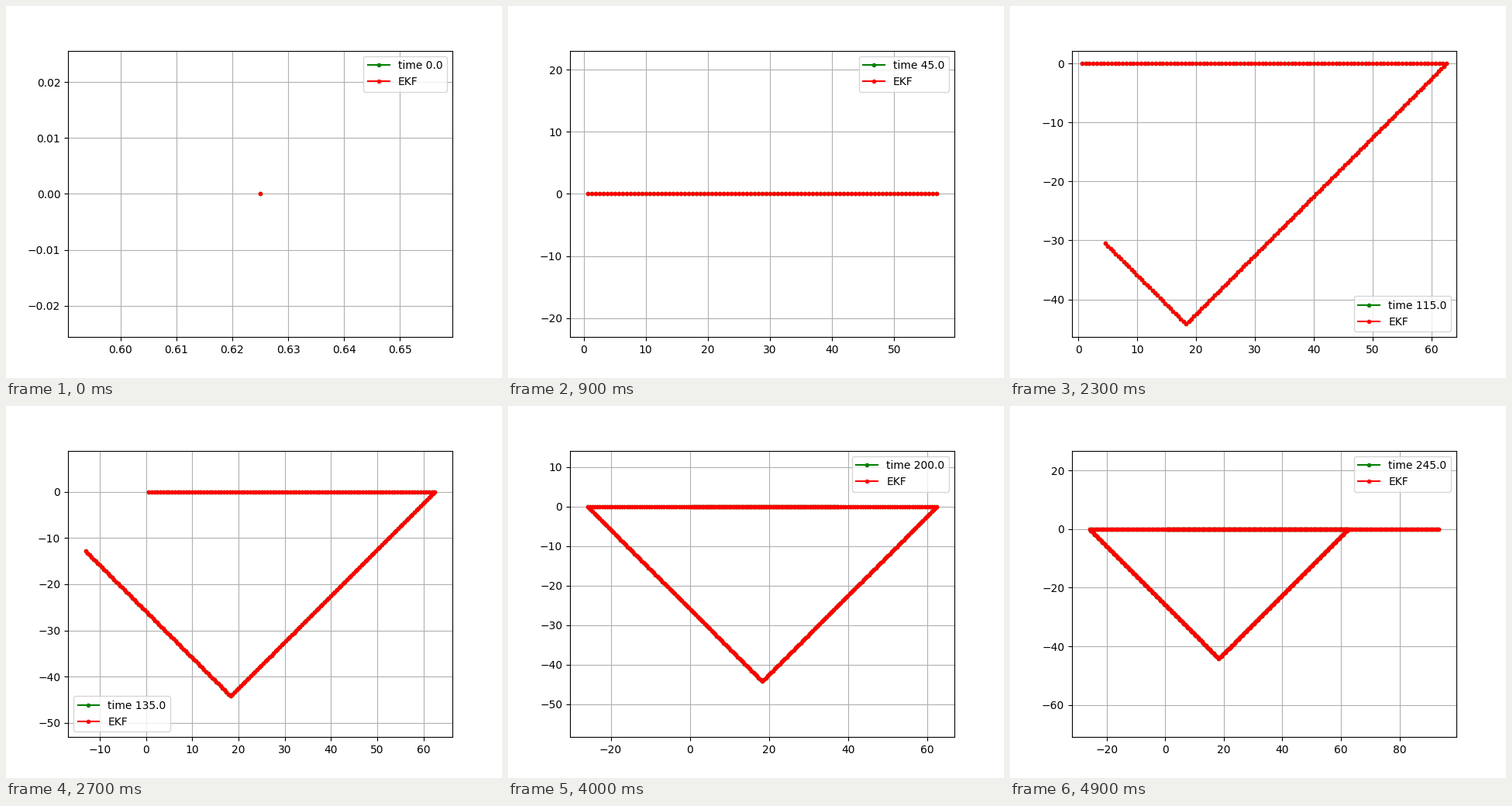
These frames come from a looping animation (640 px wide and 480 px high, 5 s). A matplotlib script:

```python
import numpy as np
import matplotlib.pyplot as plt
from matplotlib.animation import FuncAnimation

FRAMES = 50
INTERVAL = 100          # ms
DT = 0.5                # simulated seconds per sample
SPEED = 1.25
SAMPLES_PER_FRAME = 10

# Heading of each leg in degrees, and its number of samples.
HEADINGS = [0, -135, 135, 0]
LEG_SAMPLES = [100, 100, 100, 200]


def make_path():
    angles = np.radians(np.repeat(HEADINGS, LEG_SAMPLES))
    x = np.cumsum(SPEED * DT * np.cos(angles))
    y = np.cumsum(SPEED * DT * np.sin(angles))
    return x, y


path_x, path_y = make_path()
fig, ax = plt.subplots(figsize=(6.4, 4.8), dpi=100)


def draw(frame):
    last = frame * SAMPLES_PER_FRAME
    x, y = path_x[:last + 1], path_y[:last + 1]
    ax.cla()
    ax.plot(x, y, "g.-", label=f"time {last * DT:.1f}")
    ax.plot(x, y, "r.-", label="EKF")
    ax.axis("equal")
    ax.grid(True)
    ax.legend()


animation = FuncAnimation(fig, draw, frames=FRAMES, interval=INTERVAL,
                          repeat=True, repeat_delay=0)
plt.show()
```
